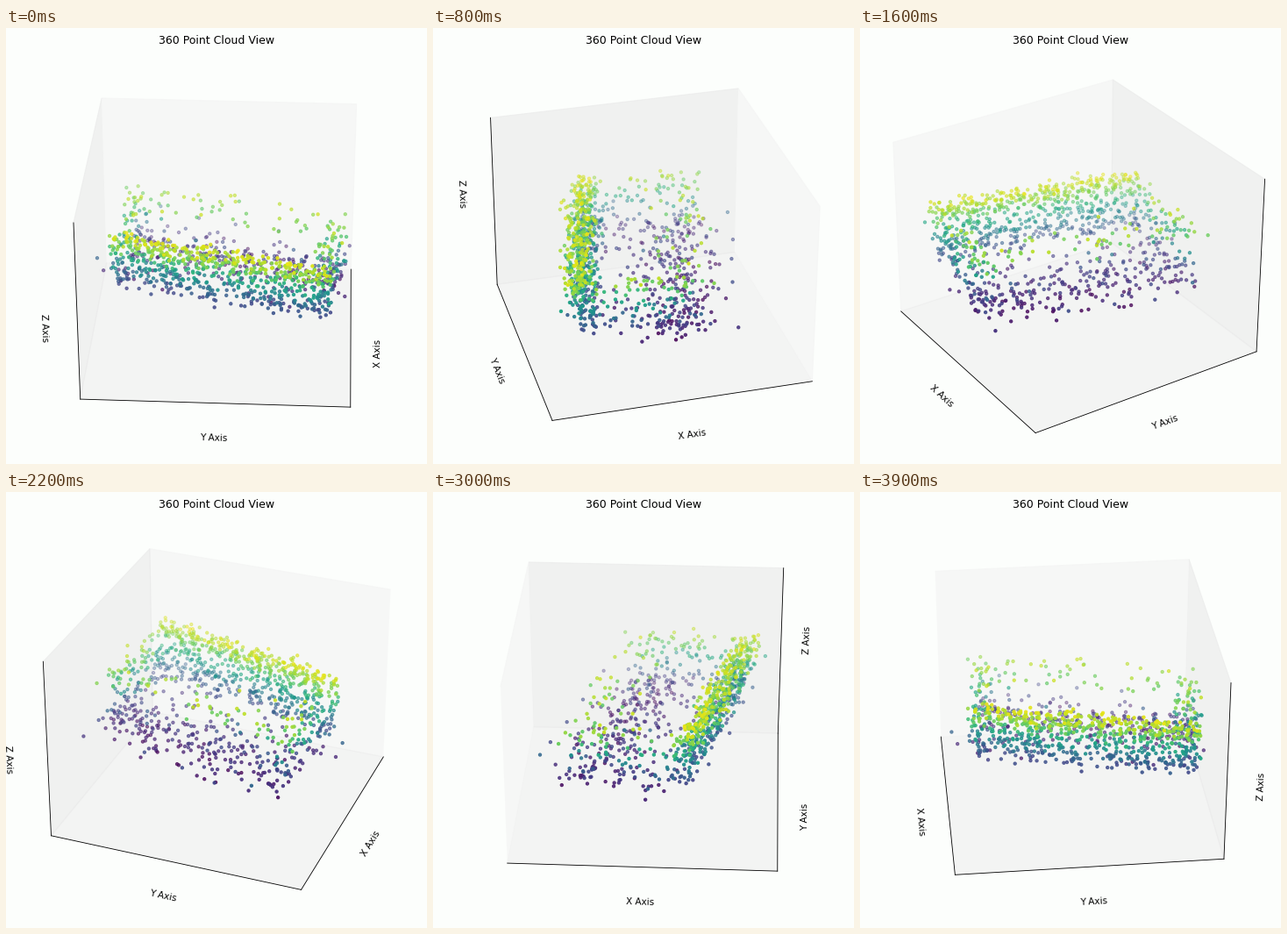
A matplotlib script for the animation above (4 s loop, 480 px wide and 497 px high).

```python
import numpy as np
import matplotlib.pyplot as plt
from matplotlib.animation import FuncAnimation

W, H, DPI = 480, 497, 75
FRAMES, INTERVAL = 40, 100
ELEV, AZIM = 30, 3
BG = "#fcfefc"
LIM_XY, LIM_Z = 0.5953, 0.4465
TILT = np.radians(15)

rng = np.random.default_rng(11)


def spread(n, lo, hi):
    return rng.uniform(lo, hi, n)


def around(n, mean, sd):
    return rng.normal(mean, sd, n)


def make_cloud():
    """Car-like shell: across, along and height of every point."""
    q0, q1 = -0.42, 0.6

    def side(n, low):
        z = spread(n, low, 0.165)
        return around(n, 0.29, 0.033) + 0.15 * z, spread(n, q0, q1), z

    def end(n, q):
        return spread(n, -0.24, 0.26), around(n, q, 0.035), spread(n, -0.14, 0.155)

    parts = [
        side(480, -0.1),
        side(140, 0.09),
        # floor
        (around(220, -0.15, 0.085), spread(220, q0, q1), around(220, -0.122, 0.022)),
        (spread(45, -0.05, 0.25), spread(45, q0, q1), around(45, -0.11, 0.02)),
        end(70, q0 + 0.02),
        end(85, q1 - 0.05),
        # sparse far rim
        (around(45, -0.15, 0.07), spread(45, q0, q1), spread(45, 0.085, 0.15)),
        # strays
        (spread(8, -0.3, 0.4), spread(8, -0.56, 0.6), spread(8, -0.16, 0.18)),
    ]
    p, q, z = (np.concatenate(c) for c in zip(*parts))
    q += 0.15 * (p - 0.3)
    c, s = np.cos(TILT), np.sin(TILT)
    return c * p + s * q, -s * p + c * q, z


def shade(azim):
    """Point colours, fading with distance from the viewer."""
    a, e = np.radians(azim), np.radians(ELEV)
    near = (x * np.cos(a) + y * np.sin(a)) * np.cos(e) + z * np.sin(e)
    rgba = colors.copy()
    rgba[:, 3] = 0.3 + 0.7 * (near - near.min()) / np.ptp(near)
    return rgba


fig = plt.figure(figsize=(W / DPI, (H + 0.01) / DPI), dpi=DPI, facecolor=BG)
size = 465.4
ax = fig.add_axes([7.4 / W, 7.6 / H, size / W, size / H], projection="3d")
ax.set_facecolor(BG)

x, y, z = make_cloud()
colors = plt.get_cmap("viridis")((z + 0.165) / 0.34)
dots = ax.scatter(x, y, z, c=shade(AZIM), s=10, depthshade=False)

ax.set(xlim=(-LIM_XY, LIM_XY), ylim=(-LIM_XY, LIM_XY), zlim=(-LIM_Z, LIM_Z),
       xticks=[], yticks=[], zticks=[],
       xlabel="X Axis", ylabel="Y Axis", zlabel="Z Axis")
# 3D axes scale the title height by 0.92
ax.set_title("360 Point Cloud View", y=1 / 0.92)


def update(i):
    azim = AZIM + 360 * i / FRAMES
    ax.view_init(elev=ELEV, azim=azim)
    dots.set_facecolor(shade(azim))
    return []


anim = FuncAnimation(fig, update, frames=FRAMES, interval=INTERVAL,
                     init_func=lambda: update(0), repeat=True)
plt.show()
```
